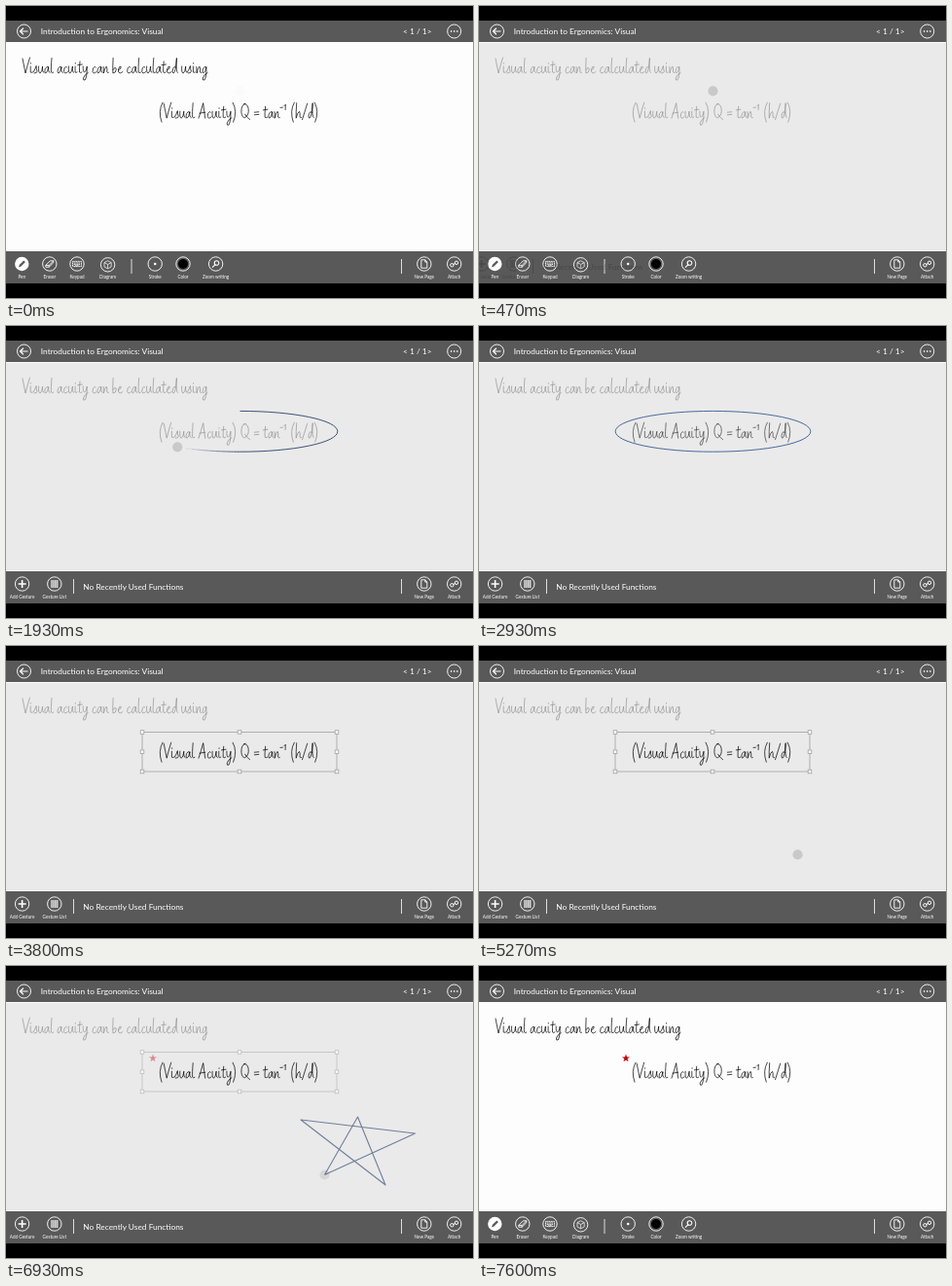
These frames come from a looping animation (480x300 px, 7.99 s). An HTML page:

```html
<!DOCTYPE html>
<html lang="en">
<head>
<meta charset="utf-8">
<title>Gesture annotation</title>
<style>
  html, body { margin: 0; width: 100%; height: 100%; overflow: hidden; background: #000; }
  svg { display: block; width: 100vw; height: 100vh; font-family: Lato, "Open Sans", sans-serif; }
  .ui { color: #fff; fill: none; stroke: currentColor; stroke-width: .9; }
  .ui text, .solid { fill: currentColor; stroke: none; }
  .title { font-size: 8.35px; }
  .label { font-size: 4.65px; text-anchor: middle; }
  .ink { fill: none; stroke: #000; stroke-width: .72; stroke-linecap: round; stroke-linejoin: round; }
  .trail { fill: none; stroke: #1f3864; stroke-linejoin: round; }
</style>
</head>
<body>
<svg id="stage" viewBox="0 0 480 300">
  <rect width="480" height="300"/>
  <rect y="37" width="480" height="215" fill="#fdfdfd"/>
  <rect id="shade" y="38" width="480" height="213" fill-opacity=".073"/>
  <g id="sentence" class="ink" role="img"></g>
  <g id="equation" class="ink" role="img"></g>
  <g id="frame" fill="#fff" stroke="#a0a0a0" stroke-width=".8">
    <rect x="140" y="88.5" width="200" height="40.5" fill="none"/>
  </g>
  <path id="redStar" fill="#c00000"/>
  <g id="oval" class="trail" stroke-width=".85"></g>
  <g id="star" class="trail" stroke-width="1.1"></g>
  <circle id="touch" r="5.1"/>

  <rect y="15" width="480" height="22" fill="#595959"/>
  <rect y="252" width="480" height="33" fill="#595959"/>
  <g class="ui">
    <circle cx="18.5" cy="26" r="7"/>
    <path d="M22.5 26h-8m3.4-3.2L14.5 26l3.4 3.2" stroke-width="1.2"/>
    <text class="title" x="35.8" y="28.9">Introduction to Ergonomics: Visual</text>
    <text class="title" x="408" y="28.9">&lt; 1 / 1&gt;</text>
    <circle cx="460.7" cy="26" r="7"/>
    <path d="M456.9 26h1.4m1.7 0h1.4m1.7 0h1.4" stroke-width="1.4"/>
    <path d="M406.5 260v15" stroke-width=".8"/>
  </g>
  <g id="shared" class="ui"></g>
  <g id="penTools" class="ui"><path d="M129 260v15" stroke-width=".8"/></g>
  <g id="gestureTools" class="ui">
    <path d="M69.5 260v15" stroke-width=".8"/>
    <text class="title" x="79.3" y="271">No Recently Used Functions</text>
  </g>
</svg>
<script>
const $ = id => document.getElementById(id);
const LOOP = 7990, STEP = 200 / 3;

function add(parent, tag, attrs, text) {
  const el = document.createElementNS("http://www.w3.org/2000/svg", tag);
  for (const name in attrs) el.setAttribute(name, attrs[name]);
  if (text) el.textContent = text;
  return parent.appendChild(el);
}

// Single-stroke handwriting: advance and pen path, baseline at y = 0.
const TRACKING = .7;
const GLYPHS = {
  V: [6.5, "M0-15L3 0Q5-8 7.5-16"],
  i: [3.2, "M1-7V-1Q1.3 0 3-1M1.2-10.5v.6"],
  s: [4.3, "M0-1Q2-4 3-7.5Q3-4 4-2Q4 0 1 0"],
  u: [5.5, "M.5-7Q0 0 2 0Q4-1 4.5-7Q4-1 5.8-.5"],
  a: [5.5, "M4.5-6Q2.5-8 1-4.5Q0 0 1.6 0Q3.6-1 4.4-6.5Q3.8-1 5.8-.4"],
  l: [3, "M1.5-15.5Q.6-5 1-1Q1.4 .3 3.2-.8"],
  c: [4.5, "M4-6Q3-8 1.3-5Q0-.5 2 0Q3.5 0 4.8-1.4"],
  t: [4, "M2-12Q1.2-4 1.5-1Q2 .3 4-1M-.3-8.3L4.3-9"],
  y: [5.5, "M.5-7Q.3-1 2-1Q4-2 4.6-7Q4.6 4 2.5 7Q.5 8 .8 5Q2 1.5 5.6-.5"],
  n: [5.5, "M.5-6.5L.8 0Q2-6 3.6-6.8Q4.6-6 4.2-1Q4.5 0 5.8-.6"],
  b: [5, "M1-15.5Q.5-6 .8 0Q4 0 4.2-4Q3.5-7.5 .9-3.5"],
  e: [5, "M.6-3Q4-4.5 3.4-6.6Q2-8 .7-4Q.3 0 2.3 0Q4-.2 5.2-1.5"],
  d: [5.6, "M4.3-5.5Q2.5-8 1-4.5Q0 0 1.7 0Q3.8-1 4.8-15.5Q3.8-1 5.8-.4"],
  g: [5.5, "M4.3-6Q2.5-8 1-4.5Q0 0 1.7-.3Q3.6-1 4.4-6.5Q4.8 4 2.5 7Q.5 8 .8 5Q2 1.5 5.6-.5"],
  h: [6, "M1.2-15.5Q.5-6 .7 0Q2-6 4-6.8Q5-6 4.6-1Q4.8 0 6-.6"],
  A: [8, "M.3 0Q3-8 5-15.5Q5.8-8 7 0M1.3-5L7-6"],
  Q: [9.5, "M5-15Q.5-14 .8-6Q1.5 0 4.5-.5Q9-3 8-10Q7-15 3.5-14.5M4.5-4Q6-1 9.5 1.5"],
  "=": [6, "M.7-6L5.2-6.4M.7-3.4L5.2-3.8"],
  "(": [4, "M3.5-16Q-1.5-7 2.5 4"],
  ")": [4.5, "M.5-16Q5.5-7 1 4"],
  "/": [5.5, "M.3 1.5L5.5-15"],
  "⁻": [3.2, "M.3-10.8L2.7-11"],
  "¹": [3.2, "M.4-12.6L1.7-14L1.5-8.6"],
  " ": [2.6, ""]
};

function handwrite(id, x, y, text) {
  $(id).setAttribute("aria-label", text);
  for (const ch of text) {
    const [advance, d] = GLYPHS[ch];
    add($(id), "path", { d, transform: `translate(${x.toFixed(2)} ${y})` });
    x += advance + TRACKING;
  }
}
handwrite("sentence", 17, 69, "Visual acuity can be calculated using");
handwrite("equation", 157.5, 115.2, "(Visual Acuity) Q = tan⁻¹ (h/d)");

// Round toolbar button; the icon is drawn around (0, 0).
function button(group, x, label, d, opts = {}) {
  const g = add($(group), "g", { transform: `translate(${x} ${opts.y || 265})` });
  add(g, "circle", { r: 7.2, ...opts.ring });
  add(g, "path", { d, ...opts.icon });
  add(g, "text", { class: "label", y: 14.5 }, label);
}
const solid = { class: "solid" };
button("penTools", 16.3, "Pen", "M-3.4 3.4l1-2.6L2-3.6l1.6 1.6L-.8 2.4z",
  { ring: solid, icon: { fill: "#595959", stroke: "none" } });
button("penTools", 44.8, "Eraser", "M-4 1.4L.6-3.2H4L-.6 1.4zV3.2H-.6L4-1.4V-3.2M-.6 1.4V3.2");
button("penTools", 73, "Keypad", "M-4.5-2.6h9v5.2h-9zM-3.3-1h6.6M-3.3 .6h6.6M-2 1.8h4",
  { icon: { "stroke-dasharray": "1.3 .4" } });
button("penTools", 104.6, "Diagram", "M0-4L3.6-2.2V2.2L0 4L-3.6 2.2V-2.2zM-3.6-2.2L0-.3L3.6-2.2M0-.3V4",
  { y: 265.8, icon: { "stroke-width": .7 } });
button("penTools", 153.2, "Stroke", "M-1.3 0a1.3 1.3 0 1 0 2.6 0a1.3 1.3 0 1 0-2.6 0", { icon: solid });
button("penTools", 182, "Color", "M-5 0a5 5 0 1 0 10 0a5 5 0 1 0-10 0",
  { icon: { fill: "#000", stroke: "none" } });
button("penTools", 215.6, "Zoom writing", "M-1.4-1a2.3 2.3 0 1 0 4.6 0a2.3 2.3 0 1 0-4.6 0M-.8 .8L-3.6 3.6",
  { icon: { "stroke-width": 1.1 } });
button("shared", 429.8, "New Page", "M-3-4.2H1L3-2V4.2H-3zM1-4.2V-2H3");
button("shared", 460.7, "Attach", "M-4 1.2a1.7 1.7 0 1 0 3.4 0a1.7 1.7 0 1 0-3.4 0M.6-1.2a1.7 1.7 0 1 0 3.4 0a1.7 1.7 0 1 0-3.4 0M-1.4 .6L1.4-.6",
  { icon: { "stroke-width": 1 } });
button("gestureTools", 16.6, "Add Gesture", "M-4 0h8M0-4v8", { icon: { "stroke-width": 1.6 } });
button("gestureTools", 49.8, "Gesture List", "M-3.6-3h7.2M-3.6-1h7.2M-3.6 1h7.2M-3.6 3h7.2",
  { icon: { "stroke-width": 1.4, "stroke-dasharray": "1.5 .4" } });

// Selection handles on corners and edge middles.
for (const x of [140, 240, 340])
  for (const y of [88.5, 108.75, 129])
    if (x !== 240 || y !== 108.75)
      add($("frame"), "rect", { x: x - 1.8, y: y - 1.8, width: 3.6, height: 3.6 });

const starPoints = Array.from({ length: 10 }, (_, i) => {
  const r = i % 2 ? 1.7 : 4.2, a = i * Math.PI / 5;
  return `${(151 + r * Math.sin(a)).toFixed(2)} ${(94.8 - r * Math.cos(a)).toFixed(2)}`;
});
$("redStar").setAttribute("d", `M${starPoints.join("L")}Z`);

// A stroke that follows the touch point with a soft leading end.
const PIECES = 9;
function makeTrail(id, d, lag, fade) {
  const parts = Array.from({ length: PIECES }, (_, i) =>
    add($(id), "path", { d, "stroke-opacity": 1 - i / PIECES }));
  const path = parts[0], length = path.getTotalLength();
  return {
    at: u => path.getPointAtLength(u * length),
    draw(u) {
      const soft = Math.min(1, 4 * u * (1 - u));
      const end = Math.max(0, u * length - lag * soft);
      const full = Math.max(0, end - fade * soft);
      const piece = (end - full) / (PIECES - 1);
      parts.forEach((p, i) => {
        const from = i ? full + (i - 1) * piece : 0;
        const size = i ? piece : full;
        p.setAttribute("stroke-dasharray", `0 ${from} ${size} 9999`);
        p.style.display = size > .01 ? "" : "none";
      });
    }
  };
}
const oval = makeTrail("oval", "M240.5 87.4A100.4 20.9 0 0 1 240.5 129.2A100.4 20.9 0 0 1 240.5 87.4", 10, 55);
const star = makeTrail("star", "M327.5 214.5L361.5 155L390 225L303 158L420.5 172Z", 16, 26);

const clamp = v => Math.max(0, Math.min(1, v));
const ramp = (k, a, b) => clamp((k - a) / (b - a));
const cubicInOut = t => t < .5 ? 4 * t ** 3 : 1 - 4 * (1 - t) ** 3;
function cruise(t, a = .25) {
  const v = 1 / (1 - a);
  if (t < a) return v * t * t / (2 * a);
  if (t > 1 - a) return 1 - v * (1 - t) ** 2 / (2 * a);
  return v * (t - a / 2);
}

function touchOpacity(k) {
  if (k < 4) return .012;
  if (k < 7) return .08;
  if (k < 37) return .14;
  return k < 79 ? 0 : .14 * (1 - ramp(k, 102, 107));
}

function render(time) {
  // The picture advances in fifteenths of a second.
  const k = Math.floor((Math.floor(time / 10) * 10 + 5) / STEP);
  const t = k * STEP;
  const back = ramp(k, 110, 114);
  const dim = k < 7 ? 0 : 1 - back;
  const cleared = 1 - ramp(k, 102, 107);

  $("shade").style.opacity = dim;
  $("sentence").style.opacity = 1 - .64 * dim;
  $("equation").style.opacity = 1 - .64 * dim * (1 - ramp(k, 39, 48));

  const u = cubicInOut(ramp(t, 1209, 2509));
  const w = cruise(ramp(t, 5255, 6815));
  oval.draw(k < 37 ? u : 1);
  star.draw(k < 102 ? w : 1);
  $("oval").style.opacity = 1 - ramp(k, 52, 57);
  $("oval").style.stroke = k < 37 ? "#1f3864" : "#2f528f";
  $("star").style.opacity = cleared;
  $("frame").style.opacity = ramp(k, 52, 57) * cleared;
  $("redStar").style.opacity = 1 - cleared;

  const p = k < 60 ? oval.at(u) : star.at(w);
  $("touch").setAttribute("transform", `translate(${p.x} ${p.y})`);
  $("touch").style.opacity = touchOpacity(k);

  const arrive = ramp(k, 7, 11), tone = Math.round(255 * arrive);
  $("penTools").style.opacity = Math.max(1 - arrive, back);
  $("gestureTools").style.opacity = ramp(k, 6, 11) * (1 - back);
  $("gestureTools").style.color = `rgb(${tone},${tone},${tone})`;
  $("gestureTools").setAttribute("transform", `translate(${-14 * (1 - arrive)} 0)`);
}

const start = performance.now();
function tick() {
  render((performance.now() - start) % LOOP);
  requestAnimationFrame(tick);
}
tick();
</script>
</body>
</html>
```
